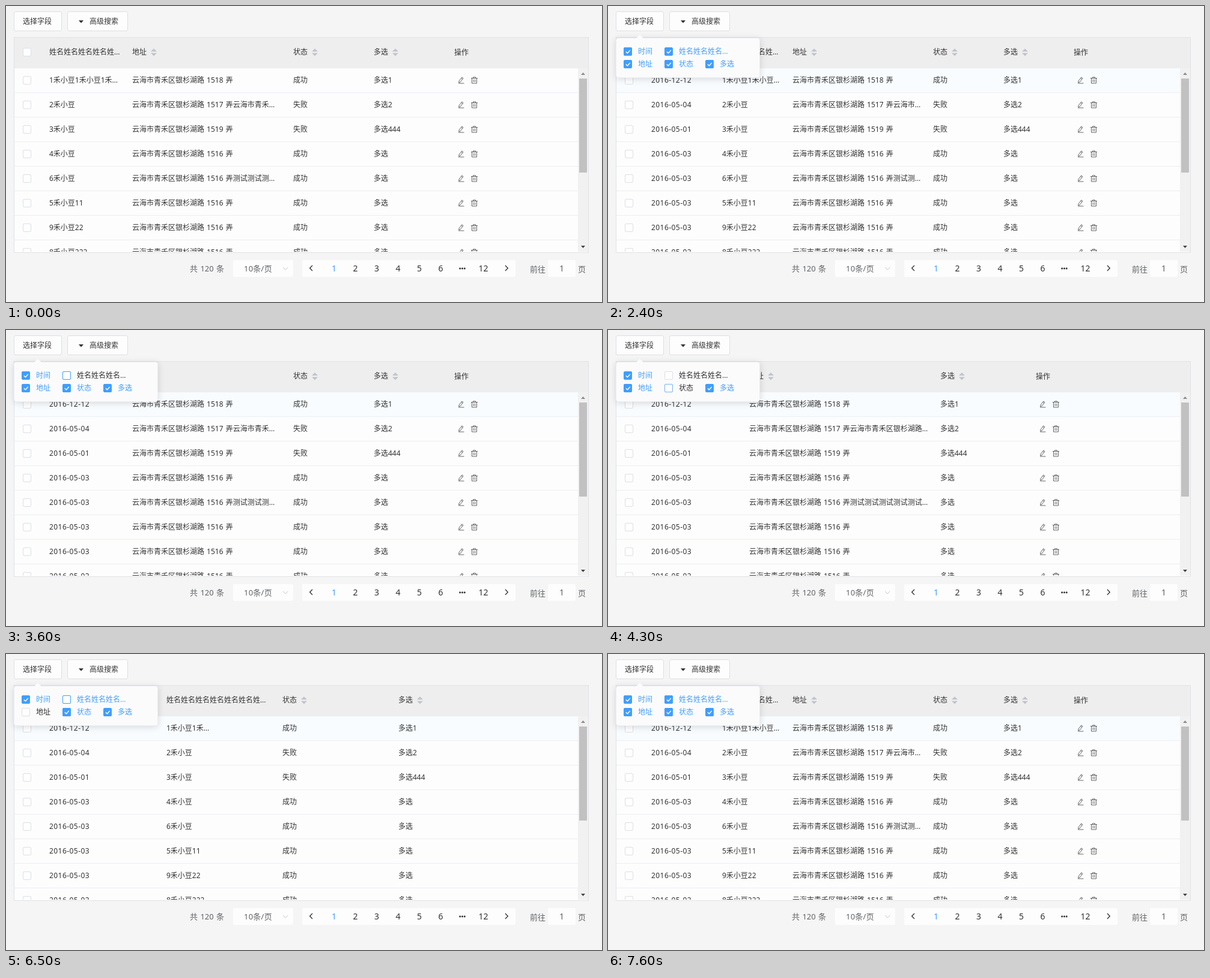
An HTML page that plays this animation: 992x494 px, repeating every 8000 ms.

```html
<!DOCTYPE html>
<html lang="zh">
<head>
<meta charset="utf-8">
<title>选择字段</title>
<style>
html, body { margin: 0; width: 100%; height: 100%; overflow: hidden; background: #f5f5f5; }
body { position: relative; color: #333; font: 12px/20px "Noto Sans", "Noto Sans CJK SC", "Noto Sans CJK", sans-serif; word-spacing: 1px; }
div, svg, span.abs { position: absolute; box-sizing: border-box; white-space: nowrap; }
svg { overflow: visible; fill: none; }
.btn { top: 9px; height: 33px; border: 1px solid #dcdfe6; border-radius: 3px; background: #fdfdfd; }
.btn.hot { background: #ecf5ff; border-color: #b3d8ff; }
.table { left: 13px; top: 52px; width: 957px; height: 360px; border: 1px solid #e0e2e6; background: #fdfdfd; }
.head { left: 14px; top: 53px; width: 955px; height: 51px; background: #eee; }
.body { left: 14px; top: 104px; width: 938px; height: 306px; overflow: hidden; }
.row { left: 0; width: 938px; height: 41px; border-bottom: 1px solid #ebeef5; }
.row.hot { background: #f8fcff; }
.cell { overflow: hidden; text-overflow: ellipsis; }
.date { letter-spacing: .44px; }
.box { width: 14px; height: 14px; border: 1px solid #dcdfe6; border-radius: 2px; background: #fff; }
.ring, .fill { left: -1px; top: -1px; width: 14px; height: 14px; border: 1px solid #409eff; border-radius: 2px; }
.fill { background: #409eff; }
.bar { left: 952px; top: 104px; width: 17px; height: 306px; background: #f1f1f1; }
.pop { left: 13px; top: 53px; width: 240px; height: 67px; border: 1px solid #ebeef5; border-radius: 4px; background: #fbfbfb; box-shadow: 0 2px 12px rgba(0,0,0,.14); }
.white { top: 424px; height: 28px; background: #fdfdfd; border-radius: 2px; }
.foot { font-size: 13px; color: #606266; }
.num { width: 40px; margin-left: -20px; text-align: center; font-size: 14px; color: #303133; }
</style>
</head>
<body>
<script>
const LOOP = 8000, STEP = 100, ROW = 41, BLUE = '#409eff';

const add = (cls, parent, left, top, text = '') => {
  const e = document.createElement('div');
  e.className = cls;
  if (left !== undefined) e.style.left = left + 'px';
  if (top !== undefined) e.style.top = top + 'px';
  e.textContent = text;
  parent.append(e);
  return e;
};
const wide = (e, w) => { e.style.width = w + 'px'; return e; };
const draw = (parent, left, top, size, paths) => {
  const e = add('', parent, left, top);
  e.innerHTML = `<svg width="${size}" height="${size}">${paths}</svg>`;
  return e;
};
const stroke = (d, color, w = 1) => `<path d="${d}" stroke="${color}" stroke-width="${w}"/>`;
const solid = (d, color) => `<path d="${d}" fill="${color}"/>`;
const clamp = x => Math.max(0, Math.min(1, x));

// Table data
const road = '云海市青禾区银杉湖路', who = '禾小豆';
const addr = (n, tail = '') => `${road} ${n} 弄${tail}`;
const names = ['1' + who + '1' + who + '1' + who + '1' + who, '2' + who, '3' + who, '4' + who,
  '6' + who, '5' + who + '11', '9' + who + '22', '8' + who + '222'];
const days = ['12-12', '05-04', '05-01', '05-03', '05-03', '05-03', '05-03', '05-02'];
const roads = [1518, 1517, 1519, 1516, 1516, 1516, 1516, 1516];
const tails = { 1: road + road, 4: '测试'.repeat(12) };
const columns = {
  t: { title: '时间', sort: true, cell: i => '2016-' + days[i] },
  n: { title: '姓名'.repeat(14), cell: i => names[i] },
  a: { title: '地址', sort: true, cell: i => addr(roads[i], tails[i]) },
  s: { title: '状态', sort: true, cell: i => i === 1 || i === 2 ? '失败' : '成功' },
  m: { title: '多选', sort: true, cell: i => '多选' + (['1', '2', '444'][i] || '') },
  o: { title: '操作' }
};

// Buttons
const pick = wide(add('btn', document.body, 13), 80);
add('', pick, 14, 6, '选择字段');
const search = wide(add('btn', document.body, 102), 101);
add('', search, 36, 6, '高级搜索');
draw(search, 18, 14, 8, solid('M0 0H8L4 4.5Z', '#333'));

// Table
add('table', document.body);
const head = add('head', document.body);
const body = add('body', document.body);
const bar = add('bar', document.body);
draw(bar, 5, 7, 8, solid('M0 4L3.5 0L7 4Z', '#8a8a8a'));
draw(bar, 5, 296, 8, solid('M0 0H7L3.5 4Z', '#444'));
const thumb = wide(add('', bar, 2, 17), 13);
thumb.style.height = '157px';
thumb.style.background = '#c1c1c1';

const pencil = stroke('M2 7.2L6.8 .9L9 2.6L4.2 8.9L1.7 9.9ZM5.6 2.5L7.8 4.2M1 11H10.5', '#555', .9);
const bin = stroke('M0 2.5H11M3.5 2.5V.8H7.5V2.5M1.5 2.5V11H9.5V2.5M4.2 4.5V9M6.8 4.5V9', '#555', .9);
const carets = solid('M0 5L5 0L10 5Z', '#c0c4cc') + solid('M0 7.5H10L5 12.5Z', '#c0c4cc');

add('box', head, 14, 17);
const rows = [];
for (let i = 0; i < 8; i++) {
  const row = add('row', body, 0, i * ROW);
  add('box', row, 14, 13);
  rows.push(row);
}
for (const key in columns) {
  const c = columns[key];
  c.top = add('', head, 0, 0);
  c.label = add('cell', c.top, 0, key === 'o' ? 15 : 14, c.title);
  if (c.sort) draw(c.top, 31, 17.5, 10, carets);
  c.mid = add('', body, 0, 0);
  c.cells = rows.map((_, i) => {
    const y = i * ROW;
    if (c.cell) return add(key === 't' ? 'cell date' : 'cell', c.mid, 0, y + 10, c.cell(i));
    draw(c.mid, 6, y + 14, 11, pencil);
    draw(c.mid, 28, y + 14, 11, bin);
  });
}

// Pager
add('foot', document.body, 306, 428, '共 120 条');
wide(add('white', document.body, 378), 100);
add('foot', document.body, 396, 428, '10条/页').style.letterSpacing = '.25px';
draw(document.body, 461, 436, 9, stroke('M0 0L4.2 4.2L8.4 0', '#c0c4cc'));
wide(add('white', document.body, 493), 355);
draw(document.body, 505, 433, 9, stroke('M5 0L.7 4.5L5 9', '#303133', 1.3));
draw(document.body, 831, 433, 9, stroke('M0 0L4.3 4.5L0 9', '#303133', 1.3));
['1', '2', '3', '4', '5', '6', '', '12'].forEach((s, i) => {
  const n = add('num', document.body, 546 + i * 35.5, 428, s);
  if (!i) n.style.color = BLUE;
});
draw(document.body, 754, 436, 12,
  [1.7, 5.5, 9.3].map(x => `<circle cx="${x}" cy="2" r="1.5" fill="#303133"/>`).join(''));
add('foot', document.body, 872, 429, '前往');
wide(add('white', document.body, 902), 46);
add('num', document.body, 925, 428, '1').style.color = '#606266';
add('foot', document.body, 952, 429, '页');

// Field chooser
const pop = add('pop', document.body);
draw(pop, 33, -7, 12, solid('M0 7L6 1L12 7Z', '#fbfbfb'));
// flips: times the box is toggled; focus: spans with a blue outline
const fields = [
  { text: '时间', x: 0, y: 0, on: 0, flips: [2250], focus: [[2250, 2950]] },
  { text: '姓名姓名姓名…', x: 1, y: 0, on: 1, flips: [3000, 6500], focus: [[2950, 3650], [4850, 4950], [6250, 9000]] },
  { text: '地址', x: 0, y: 1, on: 1, flips: [4400, 7400], focus: [[4250, 5220], [7300, 9000]] },
  { text: '状态', x: 1, y: 1, on: 1, flips: [3650, 5400], focus: [[3650, 4250], [5000, 9000]] },
  { text: '多选', x: 2, y: 1, on: 1, flips: [], focus: [] }
];
for (const f of fields) {
  const x = 12 + f.x * 68, y = 15 + f.y * 21;
  const box = add('box', pop, x, y);
  f.ring = add('ring', box);
  f.fill = add('fill', box);
  draw(f.fill, 2, 2, 9, stroke('M.8 4.2L3.4 6.8L7.8 1.8', '#fff', 1.3));
  f.label = add('', pop, x + 24, y - 3, f.text);
}

// Column widths by number of units; the address takes two
const unit = { 2: 247, 3: 193, 4: 159, 5: 134, 6: 117 };
const first = { 2: 248, 3: 195, 4: 163, 5: 138, 6: 118 };
const widthsOf = keys => {
  const n = keys.length + (keys.includes('a') ? 1 : 0);
  const w = [...keys].map((k, i) => (i ? unit[n] : first[n]) * (k === 'a' ? 2 : 1));
  return [...w, Math.round(unit[n] * 1.586)];
};

// [time, shown columns, columns whose widths still apply]
const layouts = [
  [0, 'nasm'],
  [2300, 'tnasm', 'nasm'], [2400, 'tnasm'],
  [3000, 'tasm', 'tnasm'], [3100, 'tasm'],
  [3700, 'tam', 'tasm'], [3800, 'tam'],
  [4400, 'tm', 'tam'], [4500, 'tm'],
  [5400, 'tsm', 'tm'], [5500, 'tsm'],
  [6500, 'tnsm', 'tsm'], [6600, 'tnsm'],
  [7400, 'tnasm', 'tnsm'], [7500, 'tnasm']
];

let shown;
function arrange(layout) {
  if (layout === shown) return;
  shown = layout;
  const keys = layout[1] + 'o', from = layout[2] || layout[1];
  const widths = widthsOf(from);
  for (const key in columns) {
    const c = columns[key], i = keys.indexOf(key), slot = widths[i];
    const visible = i >= 0 && slot !== undefined;
    c.top.style.display = c.mid.style.display = visible ? '' : 'none';
    if (!visible) continue;
    const left = 58 + widths.slice(0, i).reduce((a, b) => a + b, 0);
    c.top.style.left = c.mid.style.left = left + 'px';
    wide(c.label, slot - 19);
    const own = (from + 'o').indexOf(key);
    const room = Math.min(slot, own < 0 ? 99 : widths[own]) - 19;
    if (c.cell) c.cells.forEach(e => wide(e, room));
  }
}

function tick(f, t) {
  let on = f.on, last = -1000;
  for (const time of f.flips) if (t >= time) { on = 1 - on; last = time; }
  const p = clamp((t - last) / 150);
  f.fill.style.opacity = on ? p : 1 - p;
  f.ring.style.opacity = Math.max(0, ...f.focus.map(([a, b]) => clamp((t - a) / 100) - clamp((t - b) / 150)));
  f.label.style.color = on ? BLUE : '#303133';
}

function render(t) {
  arrange(layouts.filter(l => l[0] <= t).pop());
  fields.forEach(f => tick(f, t));
  rows[0].classList.toggle('hot', t >= 500);
  search.classList.toggle('hot', t >= 800 && t < 900);
  pick.classList.toggle('hot', t >= 900 && t < 2100);
  pop.style.opacity = clamp((t - 1100) / 400);
}

const start = performance.now();
function frame() {
  const t = (performance.now() - start) % LOOP;
  render(Math.floor(t / STEP) * STEP);
  requestAnimationFrame(frame);
}
frame();
</script>
</body>
</html>
```
